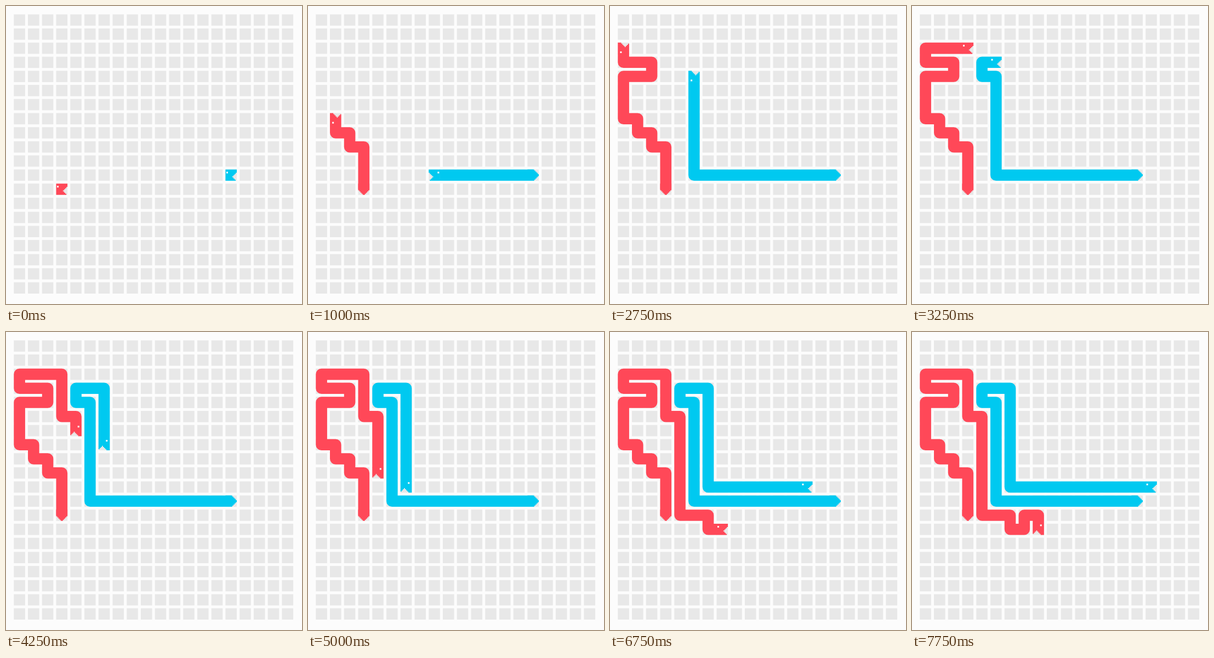
Recreate the animation shown at these times as an HTML page with a canvas. Size 540 by 544 pixels, loop 8 s.

```html
<!DOCTYPE html>
<html lang="en">
<head>
<meta charset="utf-8">
<title>Two snakes on a grid</title>
<style>
  html, body { margin: 0; width: 100%; height: 100%; overflow: hidden; background: #fcfcfc; }
  canvas { display: block; }
</style>
</head>
<body>
<canvas id="stage" width="540" height="544"></canvas>
<script>
const ctx = document.getElementById('stage').getContext('2d');
const BACK = '#fcfcfc', TILE = '#e8e8e8';
const LEFT = 14.3, TOP = 15.3, PITCH = 25.74, SIZE = 20.6, HALF = SIZE / 2, UNIT = SIZE / 10;
const LOOP = 8000, TICK = 250;

// Moves made by the end of each tick; the pace settles to one per tick.
const MOVES = [0, 0, 2, 5, 7, 9, 11, 12, 13, 14, 16, 17, 19, 20, 21, 23,
  24, 25, 26, 27, 28, 29, 30, 31, 32, 33, 34, 35, 36, 36, 37, 38];

const DIRS = { U: [0, -1], D: [0, 1], L: [-1, 0], R: [1, 0] };

// Widths, in units, of the rows that make up the stepped end pieces.
const HEAD_ROWS = [10, 10, 10, 9, 8, 7, 6, 7, 8, 9];
const TAIL_ROWS = [6, 7, 8, 9, 10, 10, 9, 8, 7, 6];

const snakes = [
  { color: '#ff4858', start: [3, 12], route: 'UUULULULUUURRULLURRRDDDRDDDDDDDRRDRURD' },
  { color: '#00c9f0', start: [15, 11], route: 'LLLLLLLLLLUUUUUUULURRDDDDDDDRRRRRRRRRR' }
];

const center = ([col, row]) => [LEFT + col * PITCH + HALF, TOP + row * PITCH + HALF];

for (const snake of snakes) {
  snake.cells = [snake.start];
  for (const letter of snake.route) {
    const [col, row] = snake.cells.at(-1), [dx, dy] = DIRS[letter];
    snake.cells.push([col + dx, row + dy]);
  }
}

// Draws inside a cell whose forward side is its right edge.
function inCell(cell, [dx, dy], draw) {
  ctx.save();
  ctx.translate(...center(cell));
  if (dx < 0) ctx.scale(-1, 1);
  else ctx.rotate(dy * Math.PI / 2);
  ctx.translate(-HALF, -HALF);
  draw();
  ctx.restore();
}

function fillRows(rows) {
  ctx.beginPath();
  rows.forEach((width, i) => ctx.rect(0, i * UNIT, width * UNIT, UNIT));
  ctx.fill();
}

function drawBody(cells, [dx, dy]) {
  const [x, y] = center(cells.at(-1));
  ctx.beginPath();
  for (const cell of cells.slice(0, -1)) ctx.lineTo(...center(cell));
  ctx.lineTo(x - dx * (HALF - 0.5), y - dy * (HALF - 0.5));
  ctx.stroke();
}

function drawSnake({ color, cells, route }, moves) {
  const heading = DIRS[route[moves - 1] || 'R'];
  ctx.fillStyle = ctx.strokeStyle = color;
  if (moves > 0) {
    const [dx, dy] = DIRS[route[0]];
    inCell(cells[0], [-dx, -dy], () => fillRows(TAIL_ROWS));
    drawBody(cells.slice(0, moves + 1), heading);
  }
  inCell(cells[moves], heading, () => {
    fillRows(HEAD_ROWS);
    ctx.fillStyle = BACK;
    ctx.fillRect(1.5, 4.1, 3, 3);
  });
}

function drawGrid() {
  ctx.fillStyle = BACK;
  ctx.fillRect(0, 0, 540, 544);
  ctx.fillStyle = TILE;
  for (let col = 0; col < 20; col++)
    for (let row = 0; row < 20; row++)
      ctx.fillRect(LEFT + col * PITCH, TOP + row * PITCH, SIZE, SIZE);
}

ctx.lineWidth = SIZE;
ctx.lineJoin = 'round';

const begin = performance.now();
function render() {
  const time = (performance.now() - begin) % LOOP;
  const moves = MOVES[Math.floor(time / TICK)];
  drawGrid();
  for (const snake of snakes) drawSnake(snake, moves);
  requestAnimationFrame(render);
}
render();
</script>
</body>
</html>
```
